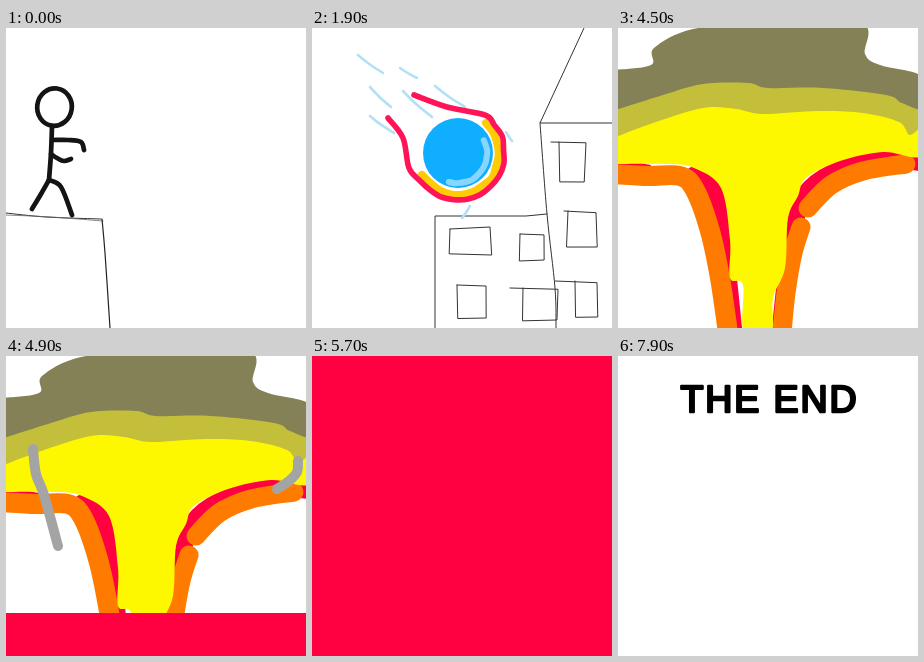
Animation of 300 by 300 pixels, one loop 9.9 s. Source, as an HTML page:

```html
<!DOCTYPE html>
<html lang="en">
<head>
<meta charset="utf-8">
<title>Dont Play With Explosions Kids</title>
<style>
html, body { margin: 0; width: 100%; height: 100%; overflow: hidden; background: #fff; }
svg { display: block; width: 100vw; height: 100vh; }
path, ellipse { fill: none; stroke-linecap: round; stroke-linejoin: round; }
text { font-family: "Liberation Sans", Arial, sans-serif; fill: #000; stroke: #000; stroke-linejoin: round; }
</style>
</head>
<body>
<svg id="stage" viewBox="0 0 300 300" xmlns="http://www.w3.org/2000/svg"></svg>
<script>
const LOOP = 9900;
const INK = '#141414', BLUE = '#10aeff', RED = '#ff0040', ORANGE = '#ff7b00',
  YELLOW = '#fdf800', GREY = '#a4a4a4', SEAM = '#ff9fb0';
const stage = document.getElementById('stage');

let seed = 7;
const jitter = size => {
  seed = seed * 16807 % 2147483647;
  return (seed / 2147483647 - .5) * 2 * size;
};

const parse = s => s.trim().split(/\s+/).map(p => p.split(',').map(Number));

// Smooth path through the given points
function curve(pts) {
  const p = typeof pts === 'string' ? parse(pts) : pts;
  let d = `M${p[0]}`;
  for (let i = 0; i < p.length - 1; i++) {
    const a = p[i - 1] || p[i], b = p[i], c = p[i + 1], e = p[i + 2] || c;
    const near = [0, 1].map(k => b[k] + (c[k] - a[k]) / 6);
    const far = [0, 1].map(k => c[k] - (e[k] - b[k]) / 6);
    d += `C${near} ${far} ${c}`;
  }
  return d;
}

const line = (d, color, width) => `<path d="${d}" stroke="${color}" stroke-width="${width}"/>`;
const brush = (pts, color, width) => line(curve(pts), color, width);
const blob = (pts, color) => `<path d="${curve(pts)}Z" style="fill:${color}"/>`;
const pen = d => line(d, '#333', 1);
const soft = (body, id = '') => `<g id="${id}" filter="url(#soft)">${body}</g>`;
const scene = (id, body) => `<g id="${id}" display="none">${body}</g>`;

// Wobbly arc around the fireball, angles in degrees
function arc(radius, from, to, wobble) {
  return Array.from({ length: 13 }, (_, i) => {
    const a = (from + (to - from) * i / 12) * Math.PI / 180;
    const r = radius + jitter(wobble);
    return [146 + r * Math.cos(a), 126 + r * Math.sin(a)];
  });
}

const ledge = '0,185 40,189 95,191';
const wall = '96,191 99,225 104,300';
const thrower =
  brush(ledge, '#333', 1) + brush('0,187 45,189 97,193', '#666', .8) + brush(wall, '#222', 1.2) +
  soft(`<g stroke="${INK}" stroke-width="4.7">
    <ellipse cx="48.5" cy="79" rx="17.3" ry="18.8" transform="rotate(8 48 79)"/>
    <path d="${curve('46,98 45,125 43,152')}"/>
    <path d="${curve('43,152 35,166 26,181')}"/>
    <path d="${curve('43,152 55,159 66,187')}"/>
    <path id="armA"/><path id="armB"/></g>`) +
  `<g id="orb"><circle r="16" fill="${BLUE}"/>${brush('12,-6 9,9 -3,12', 'rgba(255,255,255,.75)', 2.5)}</g>`;

// Hand-drawn window whose top line starts a little to the left
function pane(x, y, w, h, over) {
  const j = () => jitter(2);
  return pen(`M${x - over},${y}L${x + w},${y + j()}L${x + w + j()},${y + h}L${x + j()},${y + h + j()}L${x},${y}`);
}

const city =
  pen('M123,300V188H214L235,186') +
  pen('M272,0L228,95H300') +
  pen(curve('228,95 235,186 243,260 244,300')) +
  pane(138, 201, 40, 26, 0) + pane(208, 206, 24, 26, 0) + pane(145, 257, 29, 33, 0) +
  pane(211, 260, 35, 32, 13) + pane(247, 114, 27, 40, 8) + pane(256, 183, 28, 36, 4) +
  pane(263, 253, 22, 36, 20);

const wisp = (x, y, dx, dy) => brush([[x, y], [x + dx * .45, y + dy * .5], [x + dx, y + dy]], '#b3e0f5', 2.6);
const meteor =
  wisp(46, 27, 25, 18) + wisp(88, 40, 17, 10) + wisp(58, 59, 21, 20) + wisp(58, 88, 24, 17) +
  wisp(91, 63, 29, 26) + wisp(123, 58, 30, 21) + wisp(194, 104, 6, 9) + wisp(158, 178, -8, 12) +
  `<circle cx="146" cy="125" r="35" fill="${BLUE}"/>` +
  brush(arc(29, 108, -28, .5), 'rgba(255,255,255,.5)', 6) +
  brush(arc(41, 150, -48, 1), '#ffcb05', 8) +
  brush([...parse('76,90 91,110 97,140'), ...arc(46.5, 145, -55, 1.5), ...parse('135,79 102,67')], '#ff1457', 5.6);

const blast = soft(
  brush('-5,140 12,138 30,141', RED, 9) +
  brush('76,147 98,165 106,210 116,305', RED, 17) +
  brush('305,135 265,131 225,140 192,160 179,187 168,250 162,305', RED, 17) +
  brush('-5,146 30,148 62,148 77,162 92,203 102,250 110,305', ORANGE, 20) +
  brush('190,180 213,157 245,143 288,136', ORANGE, 19) +
  brush('183,199 175,225 168,265 164,305', ORANGE, 19) +
  blob('-5,85 150,68 305,80 305,127 265,124 222,133 188,150 180,168 170,190 167,240 155,270 153,305 126,305 125,257 112,250 112,212 103,160 76,140 50,136 -5,136', YELLOW) +
  blob('-5,70 150,45 305,60 305,92 292,107 281,94 245,85 200,83 145,86 118,81 85,80 38,94 -5,110', '#c3bf3b') +
  blob('-5,42 33,37 36,20 75,1 150,-6 243,-5 247,26 262,37 305,49 305,80 284,75 268,67 205,60 150,60 130,55 85,56 45,67 -5,83', '#838155'));

const trails = soft(
  brush('27,93 30,118 38,139 52,190', GREY, 10) +
  brush('292,105 291,116 283,125 271,133', GREY, 10), 'trails');

const flood = `<rect id="flood" width="300" height="300" fill="${RED}"/>
  <g id="seams">${pen('M0,152H85')}${line('M74,269H90M291,293L300,292', SEAM, .8)}</g>`
  .replace('stroke="#333" stroke-width="1"', 'stroke="#ff6a4c" stroke-width=".6"');

const label = (x, y, size, gap, weight, words) =>
  `<text x="${x}" y="${y}" font-size="${size}" letter-spacing="${gap}" stroke-width="${weight}">${words}</text>`;

stage.innerHTML =
  `<defs><filter id="soft" x="-10%" y="-10%" width="120%" height="120%"><feGaussianBlur stdDeviation=".55"/></filter></defs>
  <rect width="300" height="300" fill="#fff"/>` +
  scene('thrower', thrower) +
  scene('city', city + soft(meteor, 'meteor')) +
  scene('dark', '<rect width="300" height="300"/>') +
  scene('blast', blast + trails + flood) +
  scene('moral', label(15.5, 72.5, 38, -.25, 1.1, 'Dont Play With') + label(15.5, 101.5, 38, 0, 1.1, 'Explosions Kids')) +
  scene('end', label(62.5, 55.8, 37.5, 1.9, 2.5, 'THE END'));

const $ = id => document.getElementById(id);
const show = (id, on) => $(id).setAttribute('display', on ? 'inline' : 'none');
const place = (id, x, y, k = 1) => $(id).setAttribute('transform', `translate(${x} ${y}) scale(${k})`);

const cuts = [[0, 'thrower'], [1100, ''], [1200, 'city'], [2500, 'dark'],
  [4500, 'blast'], [5900, 'moral'], [7900, 'end']];
const names = cuts.map(c => c[1]).filter(Boolean);

// Blend an arm from stretched forward to pulled back
function arm(id, front, back, k) {
  const b = parse(back);
  $(id).setAttribute('d', curve(parse(front).map((p, i) => p.map((v, j) => v + (b[i][j] - v) * k))));
}

function drawThrow(t) {
  const n = Math.min(9, Math.floor(t / 100));
  const pull = n < 4 ? Math.min(1, n / 2) : 0;
  arm('armA', '47,112 62,112 75,114 78,122', '47,112 36,110 25,115 18,121', pull);
  arm('armB', '45,126 51,130 58,133 65,131', '45,126 37,133 28,134 22,130', pull);
  show('orb', n > 1);
  const u = (n - 4) / 5;
  if (u < 0) place('orb', 23, 125, .2 * n - .05);
  else place('orb', 94 + 156 * u, 120 + 81 * u * u, .8 + .2 * u);
}

function drawCity(t) {
  const i = Math.floor((t - 1700) / 200);
  show('meteor', i >= 0);
  const k = i - 1;
  const slow = k < 0 ? 1.6 : 1;
  place('meteor', 26 * k * slow, 16 * k * (k < 0 ? 1.4 : 1));
}

function drawBlast(t) {
  const i = Math.floor((t - 4500) / 200);
  show('trails', i > 0);
  $('flood').setAttribute('y', [300, 294, 257, 206, 141, 75, 0][i]);
  show('seams', i === 4);
}

const draw = { thrower: drawThrow, city: drawCity, blast: drawBlast };

function render(t) {
  const now = cuts.filter(c => c[0] <= t).pop()[1];
  names.forEach(id => show(id, id === now));
  if (draw[now]) draw[now](t);
}

const start = performance.now();
function tick() {
  render((performance.now() - start) % LOOP);
  requestAnimationFrame(tick);
}
render(0);
requestAnimationFrame(tick);
</script>
</body>
</html>
```
